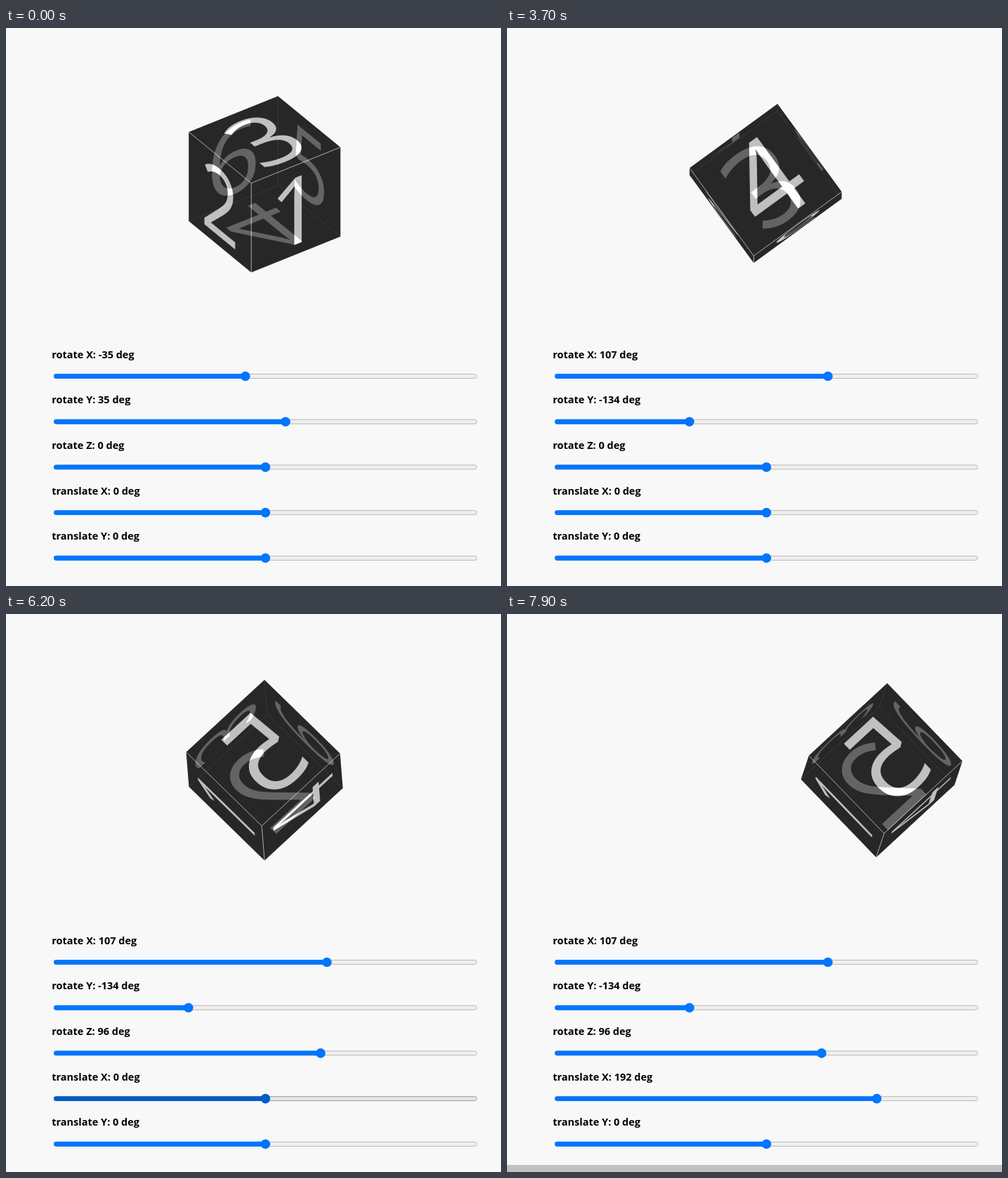
Write an HTML page that moves like this. It is 705x794 px and loops after 8 s.

```html
<!DOCTYPE html>
<html lang="en">
<head>
<meta charset="utf-8">
<title>Cube controls</title>
<style>
  html, body { margin: 0; width: 705px; height: 794px; overflow: hidden; background: #f8f8f8; }
  body { position: relative; }
  .face, #bar, svg { position: absolute; left: 0; top: 0; }
  svg { z-index: 3; fill: none; }
  .face {
    width: 155px; height: 155px; transform-origin: 0 0;
    background: #000; color: #fff; opacity: .6;
    font: 400 163px/150px "Open Sans", "Noto Sans", sans-serif; text-align: center;
  }
  text { font: 700 14.5px "Open Sans", "Noto Sans", sans-serif; fill: #000; white-space: pre; }
  #bar { top: 784px; width: 705px; height: 10px; background: #c1c1c1; }
</style>
</head>
<body>
<svg id="ui" width="705" height="794">
  <path id="far" stroke="#fff" stroke-opacity=".05"/>
  <path id="near" stroke="#fff" stroke-opacity=".6"/>
</svg>
<div id="bar"></div>
<script>
const LOOP = 8000, STEP = 100, NEVER = LOOP;
const HALF = 77.5, SCALE = 0.8614;
const PIVOT = [367.5, 221.8];
const OFFSET = [1, 1, 0]; // cube centre relative to its pivot
const LEFT = 68, RIGHT = 671, FIRST_ROW = 495.5, ROW_GAP = 64.7;

// drag: start, duration, from, to; hover: enter, leave; thumb: pointer reaches the thumb
const sliders = [
  { name: 'rotate X', drag: [1900, 800, -35, 107], hover: [500, 2700], thumb: 800 },
  { name: 'rotate Y', drag: [2900, 700, 35, -134], hover: [2800, 3700], thumb: 2800 },
  { name: 'rotate Z', drag: [4700, 800, 0, 96], hover: [4400, 5600], thumb: 4400 },
  { name: 'translate X', drag: [6400, 600, 0, 192], hover: [6200, 7100], thumb: 6200 },
  { name: 'translate Y', drag: [NEVER, 1, 0, 0], hover: [7500, 7800], thumb: NEVER }
];

const colors = {
  idle:  { fill: '#0075ff', track: '#efefef', edge: '#b2b2b2' },
  hover: { fill: '#005cc8', track: '#e5e5e5', edge: '#959595' },
  press: { fill: '#3793ff', track: '#f5f5f5', edge: '#c4c4c4' }
};

// Each face: text, normal, right and down vectors
const faces = [
  ['1', [0, 0, 1], [1, 0, 0], [0, 1, 0]],
  ['2', [-1, 0, 0], [0, 0, 1], [0, 1, 0]],
  ['3', [0, -1, 0], [1, 0, 0], [0, 0, 1]],
  ['4', [0, 1, 0], [1, 0, 0], [0, 0, -1]],
  ['5', [1, 0, 0], [0, 0, 1], [0, 1, 0]],
  ['6', [0, 0, -1], [1, 0, 0], [0, 1, 0]]
];

const $ = id => document.getElementById(id);

function svg(tag, attrs) {
  const el = document.createElementNS('http://www.w3.org/2000/svg', tag);
  set(el, attrs);
  return $('ui').appendChild(el);
}

function set(el, attrs) {
  for (const key in attrs) el.setAttribute(key, attrs[key]);
}

function glide(t, start, duration, from, to) {
  const x = Math.min(1, Math.max(0, (t - start) / duration));
  return from + (to - from) * x ** 3 * (x * (6 * x - 15) + 10);
}

// The cube follows the sliders late; the first turn is still settling when the second begins
function poseAt(t) {
  return {
    rx: glide(t, 2000, 1130, -35, 84) + glide(t, 3000, 1530, 0, 23),
    ry: glide(t, 3000, 1530, 35, -134),
    rz: glide(t, 4900, 1690, 0, 96),
    tx: glide(t, 6500, 1360, 0, 192)
  };
}

function spin([x, y, z], { rx, ry, rz }) {
  const turn = (a, b, deg) => {
    const r = deg * Math.PI / 180, c = Math.cos(r), s = Math.sin(r);
    return [a * c - b * s, a * s + b * c];
  };
  [x, y] = turn(x, y, rz);
  [z, x] = turn(z, x, ry);
  [y, z] = turn(y, z, rx);
  return [x, y, z];
}

const faceEls = faces.map(([digit]) => {
  const el = document.createElement('div');
  el.className = 'face';
  el.textContent = digit;
  return document.body.appendChild(el);
});

sliders.forEach((s, i) => {
  const y = FIRST_ROW + ROW_GAP * i;
  s.label = svg('text', { x: 65.2, y: y - 26 });
  s.track = svg('rect', { x: LEFT + 0.5, y: y - 3, width: RIGHT - LEFT - 1, height: 6, rx: 3, 'stroke-width': 0.9 });
  s.fill = svg('rect', { x: LEFT, y: y - 3.45, height: 6.9, rx: 3.45 });
  s.knob = svg('circle', { cy: y, r: 6.8 });
});

function drawCube(t) {
  const pose = poseAt(t);
  const rot = v => spin(v, pose);
  const shift = rot(OFFSET);
  const cx = PIVOT[0] + shift[0] + pose.tx * SCALE, cy = PIVOT[1] + shift[1];

  faces.forEach(([, normal, right, down], i) => {
    const n = rot(normal), u = rot(right), v = rot(down);
    const x = cx + HALF * (n[0] - u[0] - v[0]);
    const y = cy + HALF * (n[1] - u[1] - v[1]);
    const m = [u[0], u[1], v[0], v[1], x, y].map(k => k.toFixed(5));
    faceEls[i].style.transform = `matrix(${m})`;
    faceEls[i].style.zIndex = n[2] > 0 ? 2 : 1;
  });

  // Axes flipped towards the viewer; their sum is the nearest corner
  const axes = [[1, 0, 0], [0, 1, 0], [0, 0, 1]].map(rot)
    .map(a => a[2] < 0 ? a.map(k => -k) : a);
  const sum = k => axes.reduce((total, a) => total + a[k], 0);
  const edges = side => {
    const r = side * HALF;
    return axes.map(a => `M${cx + r * sum(0)} ${cy + r * sum(1)}l${-2 * r * a[0]} ${-2 * r * a[1]}`).join('');
  };
  set($('near'), { d: edges(1) });
  set($('far'), { d: edges(-1) });
}

function drawSlider(s, t) {
  const hovered = t >= s.hover[0] && t < s.hover[1];
  const c = colors[!hovered ? 'idle' : t >= s.drag[0] ? 'press' : 'hover'];
  const x = (LEFT + RIGHT) / 2 + 0.95 * SCALE * glide(t, ...s.drag);
  // The label trails the thumb by one step
  s.label.textContent = `${s.name}: ${Math.round(glide(t - STEP, ...s.drag))} deg`;
  set(s.track, { fill: c.track, stroke: c.edge });
  set(s.fill, { width: x - LEFT, fill: c.fill });
  set(s.knob, { cx: x, fill: t < s.thumb ? colors.idle.fill : c.fill });
}

function draw(t) {
  drawCube(t);
  sliders.forEach(s => drawSlider(s, t));
  $('bar').style.display = t >= 6900 ? 'block' : 'none';
}

const start = performance.now();
function tick() {
  const t = (performance.now() - start) % LOOP;
  draw(Math.floor(t / STEP) * STEP);
  requestAnimationFrame(tick);
}
tick();
</script>
</body>
</html>
```
